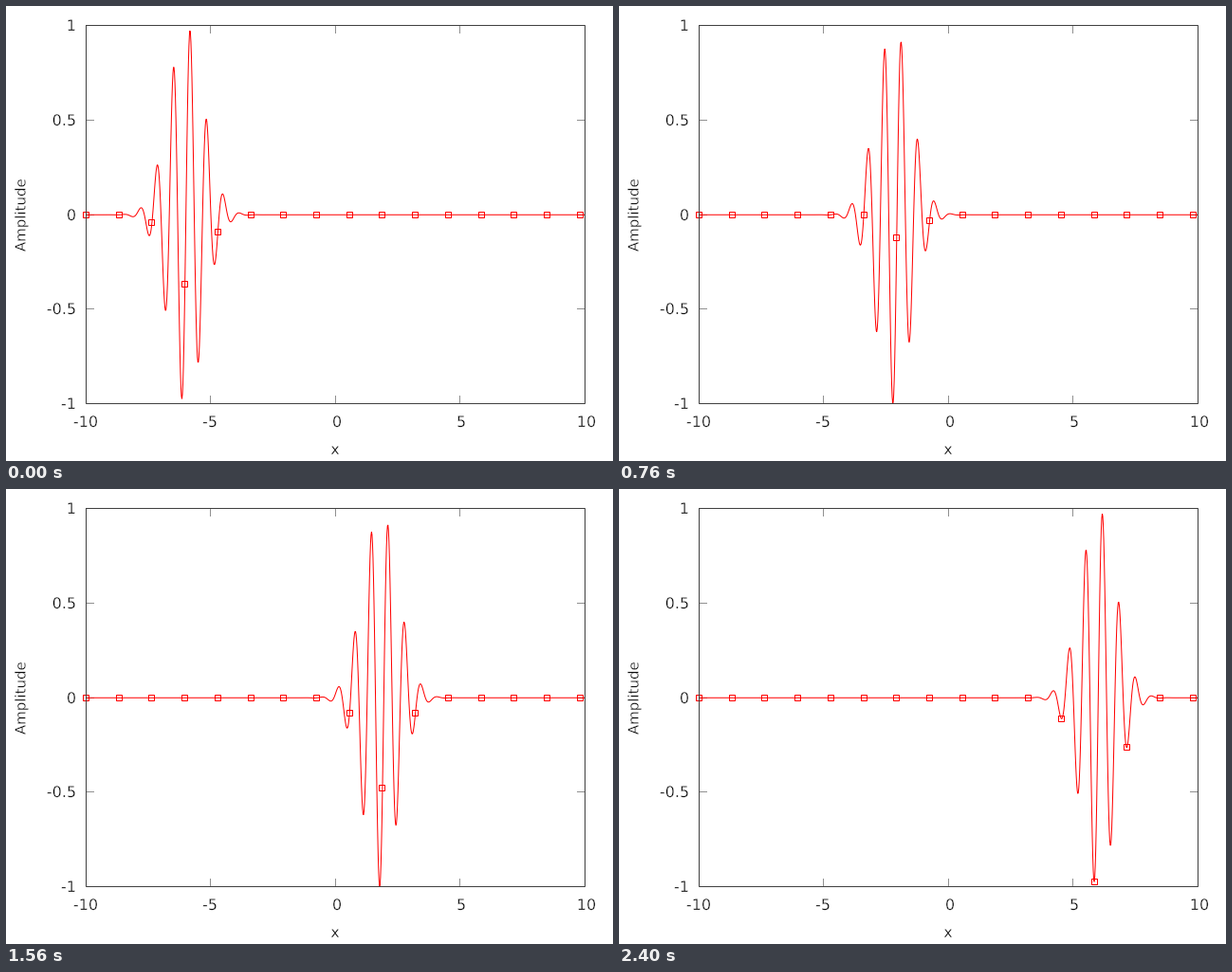
Animation of 640 by 480 pixels, one loop 2.44 s. Source, as a matplotlib script:

```python
import numpy as np
import matplotlib.pyplot as plt
from matplotlib.animation import FuncAnimation
from matplotlib.patheffects import Stroke

W, H, DPI = 640, 480, 80
PX = 72 / DPI  # one pixel in points
FRAMES, INTERVAL = 61, 40
LEFT, RIGHT, TOP, BOTTOM = 84.5, 610.5, 20.5, 419.5
TICK = 8
BORDER, TICK_COLOR, RED = "#404040", "#909090", "#ff0000"

plt.rcParams["path.simplify"] = False
fig = plt.figure(figsize=(W / DPI, H / DPI), dpi=DPI, facecolor="white")
ax = fig.add_axes([0, 0, 1, 1])
ax.set_xlim(0, W)
ax.set_ylim(H, 0)
ax.axis("off")

# A thin white outline trims the letters to a light weight
thin = [Stroke(linewidth=0.4 * PX, foreground="white")]


def to_px(x):
    return LEFT + (x + 10) * (RIGHT - LEFT) / 20


def to_py(y):
    return 220.25 - y * (BOTTOM - TOP) / 2


def crisp(v):
    return np.ceil(v) - 0.5


def line(xs, ys, color, z):
    ax.plot(xs, ys, color=color, lw=PX, zorder=z, snap=False,
            solid_capstyle="projecting", solid_joinstyle="miter")


def label(x, y, text, size=16, **kw):
    ax.text(x, y, text, family="DejaVu Sans", fontsize=size * PX,
            color="black", va="baseline", path_effects=thin, **kw)


def packet(x, n):
    t = 0.2 * n
    return np.exp(-(x + 6 - t) ** 2) * np.sin(np.pi * (3 * x - t))


# Frame, ticks and labels
line([LEFT, RIGHT, RIGHT, LEFT, LEFT], [TOP, TOP, BOTTOM, BOTTOM, TOP], BORDER, 5)
for v in (-10, -5, 0, 5, 10):
    px = crisp(to_px(v))
    if abs(v) < 10:
        line([px, px], [TOP, TOP + TICK], TICK_COLOR, 1)
        line([px, px], [BOTTOM, BOTTOM - TICK], TICK_COLOR, 1)
    label(px + (1.5 if v >= 0 else -0.5), 444, f"{v}", ha="center")
for v in (-1, -0.5, 0, 0.5, 1):
    py = crisp(to_py(v))
    if abs(v) < 1:
        line([LEFT, LEFT + TICK], [py, py], TICK_COLOR, 1)
        line([RIGHT, RIGHT - TICK], [py, py], TICK_COLOR, 1)
    label(74, py + 5.5, f"{v:g}", ha="right")
label(347, 473, "x", ha="center")
label(20.5, 220.5, "Amplitude", size=15, ha="center", rotation=90,
      rotation_mode="anchor")

# Wave packet with a square on every 66th sample
xs = np.linspace(-10, 10, 1001)
marks = xs[::66]
curve, = ax.plot([], [], color=RED, lw=PX, zorder=3, snap=False,
                 solid_joinstyle="miter")
squares, = ax.plot([], [], "s", markersize=6 * PX, zorder=4,
                   markerfacecolor="none", markeredgecolor=RED,
                   markeredgewidth=PX)


def update(n):
    curve.set_data(to_px(xs), to_py(packet(xs, n)))
    squares.set_data(np.floor(to_px(marks)), np.floor(to_py(packet(marks, n))))
    return curve, squares


anim = FuncAnimation(fig, update, frames=FRAMES, interval=INTERVAL,
                     repeat=True, repeat_delay=0, init_func=lambda: update(0))
plt.show()
```
